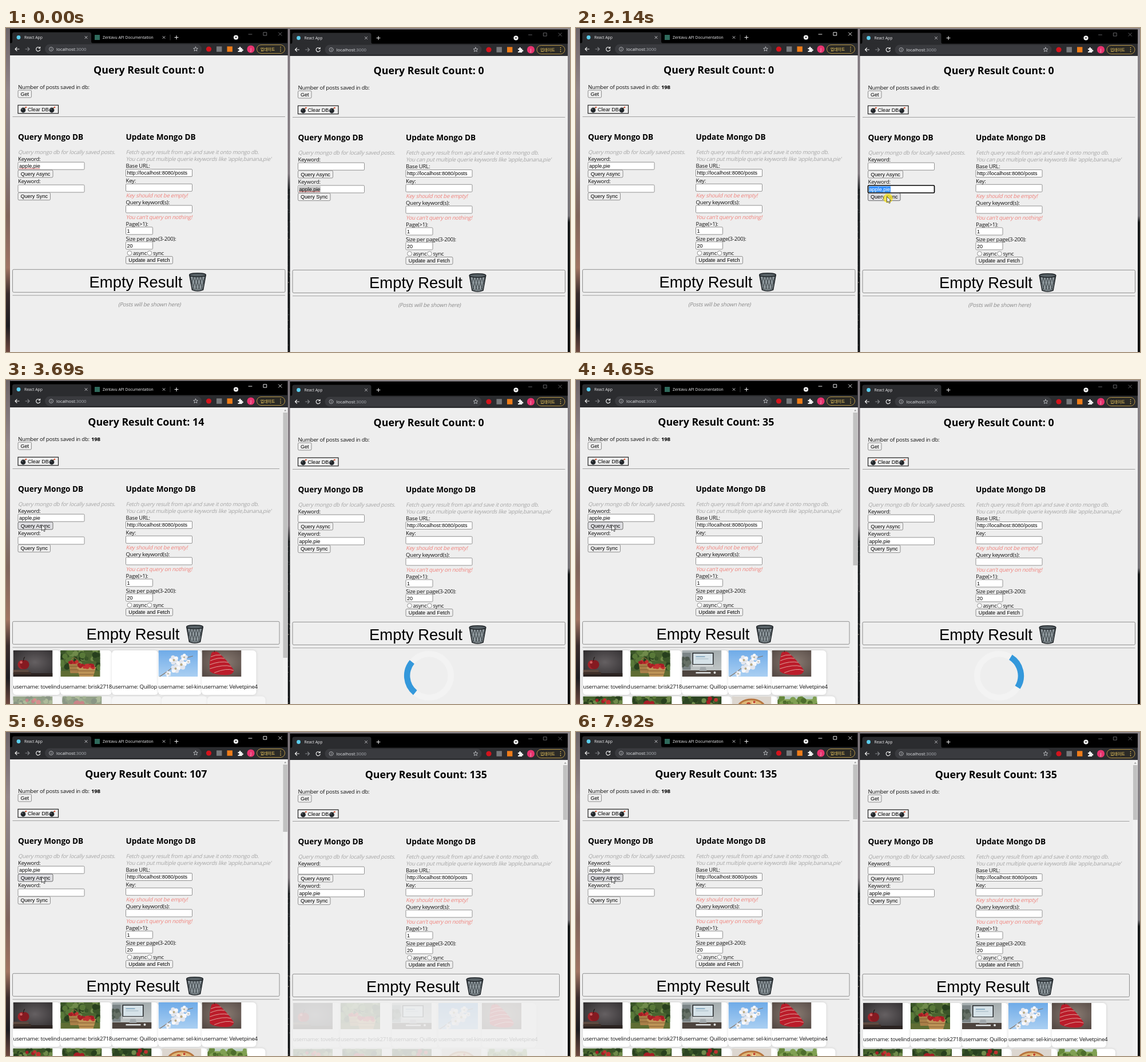
These frames come from a looping animation (986x568 px, 8000 ms). An HTML page:

```html
<!DOCTYPE html>
<html lang="en">
<head>
<meta charset="utf-8">
<title>Async and sync queries</title>
<style>
  html, body { margin: 0; width: 100%; height: 100%; overflow: hidden; background: #555; }
  svg { display: block; }
  #stage { width: 986px; height: 568px; }
  text { font-family: "Open Sans", "Noto Sans", sans-serif; white-space: pre; }
  .p { font-size: 9.6px; letter-spacing: -.025em; fill: #111; }
  .b { font-weight: 700; fill: #000; }
  .h1 { font-size: 17.8px; text-anchor: middle; }
  .h2 { font-size: 13.6px; }
  .f { font-family: "Liberation Sans", Arial, sans-serif; font-size: 9.1px; fill: #000; }
  .big { font-size: 27.4px; }
  .tab { font-size: 6.8px; fill: #f0f0f2; }
  .url { font-size: 7.8px; fill: #e8eaed; }
  .ko { font-family: "Noto Sans CJK KR", "Noto Sans CJK", sans-serif; font-size: 7px; fill: #fdd663; }
  .btn { fill: #efefef; stroke: #767676; stroke-width: .8; }
  .btn.hot { fill: #dfdfe3; stroke: #4a4a4a; }
  .inp { fill: #fff; stroke: #767676; stroke-width: .8; }
  .line { fill: none; stroke-linecap: round; stroke-linejoin: round; }
  .card { fill: #fff; filter: drop-shadow(0 0 2px #0002); }
</style>
</head>
<body>
<svg id="stage" viewBox="0 0 986 568" xmlns="http://www.w3.org/2000/svg"></svg>
<script>
const LOOP = 8000;
const GREY = '#a5a5a5', RED = '#f0827c';

const text = (x, y, s, cls = 'p', attr = '') => `<text x="${x}" y="${y}" class="${cls}" ${attr}>${s}</text>`;
const slant = (x, y, s, fill, attr = '') =>
  `<text class="p" style="fill:${fill}" transform="translate(${x} ${y}) skewX(-14)" ${attr}>${s}</text>`;
const rect = (x, y, w, h, attr = '') => `<rect x="${x}" y="${y}" width="${w}" height="${h}" ${attr}/>`;
const disc = (x, y, r, fill, attr = '') => `<circle cx="${x}" cy="${y}" r="${r}" fill="${fill}" ${attr}/>`;
const line = (d, stroke, w = 1, attr = '') => `<path class="line" d="${d}" stroke="${stroke}" stroke-width="${w}" ${attr}/>`;
const input = (x, y, w, s = '', attr = '') =>
  rect(x, y, w, 13, `rx="1.5" class="inp" ${attr}`) + text(x + 2, y + 9.8, s, 'f');
const button = (x, y, w, s, key = '') =>
  rect(x, y, w, 13, `rx="2" class="btn" data-k="${key}"`) + text(x + w / 2, y + 9.6, s, 'f', 'text-anchor="middle"');

function random(seed) {
  return () => (seed = (seed * 16807) % 2147483647) / 2147483647;
}
function blobs(seed, n, colors, r, x = 0, y = 0, w = 69, h = 46) {
  const rnd = random(seed);
  let out = '';
  for (let i = 0; i < n; i++)
    out += disc((x + rnd() * w).toFixed(1), (y + rnd() * h).toFixed(1), (r * (.6 + rnd() * .6)).toFixed(1), colors[i % colors.length]);
  return out;
}
const fill = c => rect(0, 0, 69, 46, `fill="${c}"`);
const flower = (x, y, r) => [0, 1, 2, 3, 4].map(i => {
  const a = i * 1.257 + x;
  return disc(x + r * .6 * Math.cos(a), y + r * .6 * Math.sin(a), r * .45, i % 2 ? '#f8f8fa' : '#e3e6ee');
}).join('') + disc(x, y, r * .25, '#b9ab86');

const LEAVES = ['#3a5528', '#587838', '#28401e', '#6f8a4a'];
const APPLES = ['#a51d25', '#c23230'];
const photos = [
  fill('url(#dusk)') + rect(0, 40, 69, 6, 'fill="#2b2321"') + rect(0, 34, 27, 4, 'fill="#5d4a40"') + rect(0, 38, 31, 4, 'fill="#3f3029"') +
    disc(16, 25, 8, '#a3232a') + disc(20, 25, 8, '#861a21') + disc(14, 21, 2.3, '#cf6060') + line('M18 18Q18 14 20 12', '#1e1513', 1.1),
  fill('#4a6430') + blobs(11, 46, LEAVES, 5, 0, 0, 69, 30) + rect(0, 36, 69, 10, 'fill="#5f6d33"') +
    `<path d="M14 22H33L31 40H17Z" fill="#a97f48"/><path d="M28 29H62L57 46H33Z" fill="#bd9357"/>` +
    line('M15 28H32M16 34H31M30 36H60M32 42H58', '#80592e') + line('M16 22Q23 4 32 22', '#94703f', 1.2) +
    blobs(5, 14, APPLES, 2.4, 16, 19, 15, 3) + blobs(8, 26, APPLES, 2.8, 31, 25, 28, 5),
  fill('url(#room)') + rect(0, 4, 15, 30, 'fill="#7c8587"') + blobs(21, 12, ['#4d584f', '#667066'], 3.5, 0, 14, 12, 16) +
    rect(0, 35, 69, 11, 'fill="#4d443e"') + rect(18, 4, 37, 25, 'fill="#202326"') + rect(19.5, 5.5, 34, 18.5, 'fill="#d6e2e8"') +
    rect(24, 10, 16, 2, 'fill="#8fb0c4"') + rect(24, 14, 22, 1.5, 'fill="#b4c6d0"') + rect(18, 25, 37, 4, 'fill="#cfd3d4"') +
    `<path d="M32 29H41L43 36H30Z" fill="#a3a9ac"/>` + rect(24, 38, 26, 2.5, 'fill="#dfe2e3"') + disc(57, 39, 2, '#dfe1e0'),
  fill('url(#sky)') + line('M2 46Q24 32 30 24T60 10', '#857668', 1.2) +
    flower(27, 17, 8) + flower(40, 25, 9) + flower(30, 32, 8) + flower(45, 12, 6) + flower(17, 41, 5) + flower(52, 20, 4),
  fill('url(#wood)') + `<path d="M17 4Q23 0 29 4Q46 19 56 35Q55 42 45 43Q23 44 14 37Q12 18 17 4Z" fill="#bb1c2a"/>` +
    line('M16 11Q24 7 33 8M15 18Q28 12 39 14M14 25Q32 18 46 21M14 32Q38 24 51 28M22 39Q44 30 55 35', '#dfa39c', 1) +
    line('M22 3Q21 1 22 0', '#3a2620', 1),
  fill('#46632d') + blobs(31, 60, LEAVES, 4) + blobs(3, 6, APPLES, 4.5, 20, 6, 30, 30),
  fill('#3f5a29') + blobs(47, 60, LEAVES, 4) + blobs(9, 4, APPLES, 6, 26, 10, 20, 20),
  fill('#2c4522') + blobs(59, 55, LEAVES, 4) + blobs(15, 9, APPLES, 5, 8, 4, 54, 34),
  fill('#dcd6cf') + `<ellipse cx="34" cy="22" rx="26" ry="18" fill="#b8753e"/><ellipse cx="34" cy="21" rx="22" ry="14" fill="#dfb877"/>` +
    blobs(71, 22, ['#c2402f', '#efd9a4', '#b5572f'], 3.2, 17, 9, 34, 22),
  fill('#86a455') + rect(0, 0, 69, 5, 'fill="#c2d2cc"') + blobs(83, 46, ['#4d6d2b', '#66883c', '#80a052'], 4.5, 0, 2, 69, 18) +
    `<path d="M30 20H38L52 46H14Z" fill="#b9b291"/>`
];
const users = ['tovelind', 'brisk2718', 'Quillop', 'sel-kin', 'Velvetpine4', 'marwen', 'oskeld', 'pinvale', 'dorrith', 'lunafen'];
const edges = [[12.5, 95.5, 185.5, 266.5, 342.5, 438], [12.5, 98.5, 185.5, 272.5, 352.5, 454]];

const cardRow = r => `<g data-k="row${r}">` + edges[r].slice(0, 5).map((x, i) => {
  const y = 474 + r * 80.5, n = r * 5 + i;
  return rect(x - .5, y, edges[r][i + 1] - x, 78, 'rx="6" class="card"') +
    `<use href="#p${n}" x="${x}" y="${y}" width="69" height="46" data-k="pic${n}"/>` +
    text(x, y + 67, 'username: ' + users[n]);
}).join('') + '</g>';

const bomb = (x, y) => disc(x - 1, y + 1, 4.4, '#23272b') + disc(x - 2.4, y - .6, 1.1, '#6b7278') +
  line(`M${x + 1.5} ${y - 2}l2 -2.2`, '#5c4a3a', 1.2) + disc(x + 4, y - 4, 1.3, '#e2502f');

const CAN = 'M321 434L325.5 459Q335 463 344.5 459L349 434';
function bin() {
  let mesh = '';
  for (let i = 0; i < 6; i++) mesh += `M${322 + i * 5} 435L${329 + i * 5} 459M${348 - i * 5} 435L${341 - i * 5} 459`;
  return `<path d="${CAN}Z" fill="#8f999e"/>` + line(mesh, '#3d4448', 1, 'clip-path="url(#can)"') + line(CAN, '#22272b', 1.6) +
    `<ellipse cx="335" cy="433" rx="14.4" ry="3.2" fill="#586166" stroke="#22272b" stroke-width="1.4"/>`;
}

function chrome(two) {
  const plus = two ? 298 : 161.5;
  const close = x => line(`M${x - 2} 14.5l4 4m0 -4l-4 4`, '#d5d5d8', .9);
  return rect(7, 1.5, 485.5, 47, 'fill="#000"') +
    `<path d="M8 27Q11 27 11 23V11Q11 7.5 14.5 7.5H145.5Q149 7.5 149 11V23Q149 27 152 27Z" fill="#2b2c2f"/>` +
    rect(7, 26.5, 485.5, 21.5, 'fill="#2b2c2f"') +
    disc(22, 16.5, 3.4, '#5ccfee') + text(32, 19, 'React App', 'tab') + close(140) +
    (two ? rect(155, 12, 9, 9, 'fill="#2f6a5c"') + text(169, 19, 'Zentavu API Documentation', 'tab') + close(276) +
      line('M287 12V21', '#555', .7) : '') +
    line(`M${plus - 3} 16.5h6m-3 -3v6`, '#eee', 1.1) +
    disc(402, 16.5, 4.1, '#f1f1f1') + `<path d="M400 15.4h4l-2 2.6z" fill="#222"/>` +
    `<g data-k="ctl">${line('M424 11h6M450.3 7.7h5.4v5.4h-5.4zM476.5 7.8l5.4 5.4m0 -5.4l-5.4 5.4', 'currentColor', .9)}</g>` +
    line('M23 37H16m3 -3l-3 3l3 3', '#f0f0f0', 1.1) + line('M34 37h7m-3 -3l3 3l-3 3', '#84868a', 1.1) +
    line('M59.2 35A3.6 3.6 0 1 0 59.7 38M59.7 33V35.5H57', '#f0f0f0', 1.1) +
    rect(68, 28.5, 274, 17, 'rx="8.5" fill="#3a3b3f"') +
    line('M82.5 37a3.5 3.5 0 1 0 -7 0a3.5 3.5 0 1 0 7 0M79 36.6v2M79 35v.1', '#c4c6ca', .8) +
    text(88, 39.7, 'localhost<tspan fill="#a9acb1">:3000</tspan>', 'url') +
    line('M331.5 33l1.1 2.5l2.7 .3l-2 1.8l.6 2.7l-2.4 -1.4l-2.4 1.4l.6 -2.7l-2 -1.8l2.7 -.3z', '#d0d2d6', .8) +
    disc(354.5, 37, 4.6, '#d3131c') + rect(368, 32.3, 9.4, 9.4, 'fill="#77797c"') + rect(386.5, 32.3, 9.4, 9.4, 'fill="#ef7d1a"') +
    `<path d="M405.5 35h2.3a1.5 1.5 0 1 1 2.6 0h2.3v2.4a1.5 1.5 0 1 1 0 2.6v2.1h-7.2v-2.3a1.5 1.5 0 1 0 0 -2.5z" fill="#f0f0f0"/>` +
    disc(428, 37, 6.6, '#e8336f') + text(428, 39.6, 'j', 'tab', 'text-anchor="middle"') +
    rect(438.5, 29.5, 49, 15, 'rx="7.5" fill="#2b2a26" stroke="#c9a44c" stroke-width=".9"') +
    text(444.5, 39.6, '업데이트', 'ko') + [33.6, 37, 40.4].map(y => disc(480, y, .8, '#fdd663')).join('');
}

function browser(id, dx, dy, left) {
  const u = 209.5;
  return `<g id="${id}" transform="translate(${dx} ${dy})">` + chrome(left) +
    rect(7, 48, 485.5, 540, 'fill="#eee"') +
    text(249.6, 79.7, '', 'h1 b', 'data-k="head"') +
    text(21, 106.6, 'Number of posts saved in db:') + text(149, 106.6, '198', 'p b', 'data-k="saved"') +
    button(21, 109, 23.5, 'Get', 'get') +
    rect(21, 135.3, 70.5, 14.4, 'fill="#efefef" stroke="#222" stroke-width="1.2"') +
    bomb(31, 143) + text(38, 146, 'Clear DB', 'f') + bomb(81, 143) +
    text(21, 196, 'Query Mongo DB', 'h2 b') + text(u, 196, 'Update Mongo DB', 'h2 b') +
    slant(21, 220.5, 'Query mongo db for locally saved posts.', GREY) +
    text(21, 233, 'Keyword:') + input(21, 235.2, 116, left ? 'apple,pie' : '') + button(21, 249, 61, 'Query Async', 'async') +
    text(21, 272, 'Keyword:') + input(21, 275, 116, '', 'data-k="field"') +
    (left ? '' : rect(22.5, 276.5, 38, 10.5, 'data-k="sel"') + text(23, 284.8, 'apple,pie', 'f', 'data-k="word"')) +
    button(21, 288.7, 56.5, 'Query Sync', 'sync') +
    line(`M23 ${left ? 247 : 286.3}` + 'l1.5 -1l1.5 1'.repeat(12), '#e23b3b', .7, 'data-k="squiggle"') +
    slant(u, 220.5, 'Fetch query result from api and save it onto mongo db.', GREY) +
    slant(u, 233, "You can put multiple querie keywords like 'apple,banana,pie'", GREY) +
    text(u, 245, 'Base URL:') + input(u, 247.5, 116, 'http://localhost:8080/posts') +
    text(u, 271, 'Key:') + input(u, 273.3, 116) + slant(u, 297, 'Key should not be empty!', RED) +
    text(u, 309, 'Query keyword(s):') + input(u, 311, 116) + slant(u, 334.5, "You can't query on nothing!", RED) +
    text(u, 346.5, 'Page(&gt;1):') + input(u, 349, 47, '1') +
    text(u, 372.5, 'Size per page(3-200):') + input(u, 374.8, 47, '20') +
    [216, 251].map(x => disc(x, 394.6, 3.9, '#fff', 'stroke="#767676" stroke-width=".8"')).join('') +
    text(222, 398, 'async') + text(257, 398, 'sync') + button(u, 400.4, 82, 'Update and Fetch') +
    rect(11.5, 423.3, 476.5, 40, 'rx="2" class="btn" data-k="box"') +
    `<g data-k="empty">${text(145.6, 454.5, 'Empty Result', 'f big')}${bin()}</g>` +
    ['155', '468.3'].map((y, i) => rect(11.5, y, 476.5, .9, `fill="#999" data-k="hr${i}"`)).join('') +
    slant(250.5, 487.5, '(Posts will be shown here)', '#8a8a8a', 'text-anchor="middle" data-k="hint"') +
    `<g data-k="spin">${disc(250, 517.5, 38.3, 'none', 'stroke="#f3f3f3" stroke-width="10.5"')}` +
    `<path data-k="arc" d="M222.9 490.4A38.3 38.3 0 0 1 277.1 490.4" fill="none" stroke="#3498db" stroke-width="10.5"/></g>` +
    cardRow(0) + cardRow(1) +
    `<g data-k="bar">${rect(484, 48, 8.5, 540, 'fill="#f1f1f1"')}<path d="M486 54.5h4.4l-2.2 -2.6z" fill="#999"/>` +
    rect(484.4, 57, 7.6, 10, 'fill="#c1c1c1" data-k="thumb"') + '</g></g>';
}

const stops = list => list.map(([o, c]) => `<stop offset="${o}" stop-color="${c}"/>`).join('');
const gradient = (id, ...list) => `<linearGradient id="${id}" x2="0" y2="1">${stops(list)}</linearGradient>`;
const vignette = (id, ...list) => `<radialGradient id="${id}" cx=".55" cy=".45" r=".7">${stops(list)}</radialGradient>`;

const stage = document.getElementById('stage');
stage.innerHTML = '<defs>' +
  vignette('dusk', [0, '#656062'], [1, '#2f2c2e']) + gradient('sky', [0, '#6fabe8'], [1, '#aacff2']) +
  vignette('wood', [0, '#8b7d74'], [1, '#564a45']) + gradient('room', [0, '#a4acae'], [1, '#c6cbcb']) +
  gradient('wallL', [0, '#6c6468'], [.2, '#94878a'], [.42, '#857a7c'], [.58, '#80655c'], [.74, '#a07462'], [.82, '#3a2c2c'], [.92, '#1d1c20'], [1, '#6f4a40']) +
  gradient('wallM', [0, '#7d767c'], [.45, '#827a80'], [.5, '#1c1f22'], [1, '#0e1012']) +
  gradient('wallR', [0, '#8b868a'], [.58, '#77757a'], [.6, '#15181a'], [1, '#0b0d0e']) +
  `<clipPath id="can"><path d="${CAN}Z"/></clipPath>` +
  photos.map((p, i) => `<symbol id="p${i}" viewBox="0 0 69 46">${p}</symbol>`).join('') + '</defs>' +
  rect(0, 0, 986, 568, 'fill="#8a8488"') + rect(0, 0, 8, 568, 'fill="url(#wallL)"') +
  rect(492, 0, 5, 568, 'fill="url(#wallM)"') + rect(981, 0, 5, 568, 'fill="url(#wallR)"') +
  blobs(17, 40, ['#4a4f52', '#08090a', '#6b6258'], .9, 492, 280, 5, 288) +
  browser('L', 0, 0, true) + browser('R', 489.5, 1, false) +
  `<g id="mouse">${disc(2, 3, 8.3, '#f5e21c', 'opacity=".75" id="glow"')}` +
  `<path d="M0 0V10.3L2.4 8.1L4 11.8L5.7 11.1L4.1 7.5H7.3Z" fill="#fff" stroke="#222" stroke-width=".8"/></g>`;

const parts = id => {
  const map = {};
  document.querySelectorAll(`#${id} [data-k]`).forEach(e => map[e.dataset.k] = e);
  return map;
};
const L = parts('L'), R = parts('R');
const mouse = document.getElementById('mouse'), glow = document.getElementById('glow');

const show = (e, on) => e.setAttribute('visibility', on ? 'inherit' : 'hidden');
const clamp = v => Math.max(0, Math.min(1, v));
const during = (t, a, b) => t >= a && t < b;

// piecewise linear lookup; the first column is the key
function track(keys, v, ease = p => p) {
  if (v <= keys[0][0]) return keys[0].slice(1);
  for (let i = 1; i < keys.length; i++) {
    const a = keys[i - 1], b = keys[i];
    if (v <= b[0]) {
      const p = ease((v - a[0]) / (b[0] - a[0]));
      return a.slice(1).map((n, k) => n + (b[k + 1] - n) * p);
    }
  }
  return keys[keys.length - 1].slice(1);
}
const smooth = p => p * p * (3 - 2 * p);

const COUNT = [[2590, 0], [3690, 14], [3770, 14], [4650, 35], [4720, 35], [5920, 77], [5990, 77],
  [6240, 100], [6960, 107], [7020, 107], [7850, 135]];
const THUMB = [[0, 560], [14, 487], [35, 325], [77, 217], [107, 175], [135, 153]];
const PATH = [[190, 966, 518], [880, 32, 113], [1200, 32, 113], [1790, 543.5, 295.5], [2230, 543.5, 295.5], [2500, 62.5, 253.8]];
const CLICKS = [[1000, 1160], [1880, 2225], [2540, 2680]];
const LOADED = { 2: 3900, 7: 3980, 8: 4200, 9: 4400 };
const SENT = 2223, DONE = 6830;

function layout(w, count, scroll) {
  const label = 'Query Result Count: ' + count;
  if (w.head.textContent !== label) w.head.textContent = label;
  w.head.setAttribute('x', scroll ? 244.8 : 249.6);
  for (const k of ['box', 'hr0', 'hr1']) w[k].setAttribute('width', scroll ? 466.5 : 476.5);
  w.empty.setAttribute('transform', `translate(${scroll ? -5 : 0} 0)`);
  show(w.bar, scroll);
  w.thumb.setAttribute('height', track(THUMB, count)[0] - 57);
}
const fade = (e, p) => e.setAttribute('opacity', clamp(p));

function draw(t) {
  layout(L, Math.floor(track(COUNT, t)[0] + 1e-6), t >= 3190);
  fade(L.row0, (t - 2620) / 1000);
  fade(L.row1, (t - 3190) / 1000);
  for (const n in LOADED) show(L['pic' + n], t >= LOADED[n]);
  show(L.hint, t < 2600);
  show(L.spin, false);
  show(L.saved, t >= 1200);
  show(L.squiggle, t < 500);
  L.ctl.style.color = t < 1040 ? '#77777a' : '#fff';
  L.get.classList.toggle('hot', during(t, 860, 1260));
  L.async.classList.toggle('hot', t >= 2480);

  layout(R, t >= DONE ? 135 : 0, t >= DONE);
  fade(R.row0, (t - DONE) / 1000);
  fade(R.row1, (t - DONE) / 1000);
  show(R.hint, t < SENT);
  show(R.spin, during(t, SENT, DONE));
  R.arc.setAttribute('transform', `rotate(${(t - SENT) * .18} 250 517.5)`);
  show(R.saved, false);
  show(R.squiggle, t < 500);
  R.ctl.style.color = '#6c6c70';
  const focus = during(t, 500, SENT);
  R.field.style.cssText = focus ? 'stroke:#000;stroke-width:1.7' : '';
  show(R.sel, t < SENT);
  R.sel.setAttribute('fill', focus ? '#3390ff' : '#c8c8c8');
  R.word.style.fill = focus ? '#fff' : '#000';
  R.sync.classList.toggle('hot', during(t, 1790, 2280));

  const [x, y] = track(PATH, t, smooth);
  show(mouse, t >= 190);
  mouse.setAttribute('transform', `translate(${x} ${y})`);
  show(glow, t >= 190 && CLICKS.some(([a, b]) => during(t, a, b)));
}

const start = performance.now();
function tick() {
  draw((performance.now() - start) % LOOP);
  requestAnimationFrame(tick);
}
tick();
</script>
</body>
</html>
```
